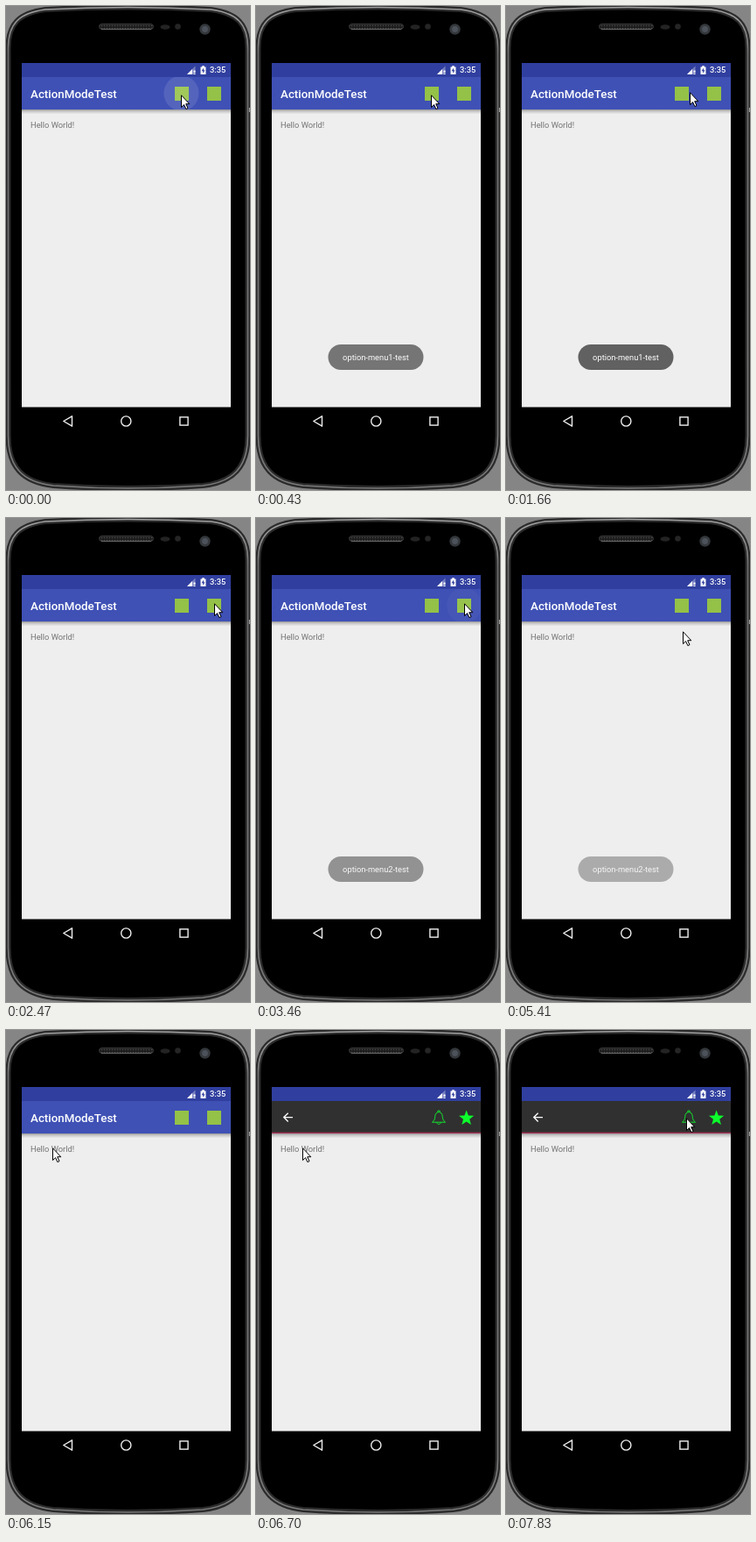
Recreate the animation shown at these times as an HTML page. Size 279 by 552 pixels, loop 8 s.

```html
<!DOCTYPE html>
<html lang="en">
<head>
<meta charset="utf-8">
<title>Action mode demo</title>
<style>
html, body { margin: 0; width: 100%; height: 100%; overflow: hidden; background: #858585; }
svg { display: block; width: 100%; height: 100%; }
text { font-family: Roboto, sans-serif; }
</style>
</head>
<body>
<svg viewBox="0 0 279 552">
  <defs>
    <linearGradient id="shade" x2="0" y2="1">
      <stop stop-opacity=".36"/>
      <stop offset=".4" stop-opacity=".15"/>
      <stop offset="1" stop-opacity="0"/>
    </linearGradient>
    <linearGradient id="rim" x2="0" y2="1">
      <stop stop-color="#a2a2a2"/>
      <stop offset=".1" stop-color="#707070"/>
      <stop offset="1" stop-color="#7a7a7a"/>
    </linearGradient>
    <pattern id="mesh" width="3" height="3" patternUnits="userSpaceOnUse">
      <rect width="3" height="3" fill="#1c1c1c"/>
      <circle cx="1.5" cy="1.5" r=".8" fill="#4a4a4a"/>
    </pattern>
    <clipPath id="bar"><rect x="18" y="81" width="239" height="37"/></clipPath>
    <path id="body" d="M2.5 48C2.500 20 15 8 45 4Q139 -1 234 4C264 8 276.500 20 276.500 48V490C276.500 526 260 543 225 547Q139 553 54 547C19 543 2.500 526 2.500 490Z"/>
  </defs>

  <rect width="279" height="552" fill="#858585"/>
  <g fill="none">
    <use href="#body" fill="#000" stroke="#2b2b2b" stroke-width="6"/>
    <use href="#body" stroke="url(#rim)" stroke-width="1.6"/>
  </g>
  <path d="M278.4 116v5" stroke="#aaa"/>

  <rect x="106.500" y="20.500" width="62" height="6" rx="3" fill="url(#mesh)" stroke="#444" stroke-width=".8"/>
  <path d="M109 26.600H166" stroke="#777" stroke-width=".8"/>
  <ellipse cx="182" cy="24" rx="5.5" ry="2.8" fill="#232323"/>
  <circle cx="196.5" cy="23.5" r="3.3" fill="#252525"/>
  <circle cx="227.5" cy="26.5" r="6.2" fill="#34383c"/>
  <circle cx="227.5" cy="26.5" r="3.4" fill="#4c525a"/>

  <rect x="18" y="118" width="239" height="340" fill="#eee"/>
  <rect x="18" y="118" width="239" height="5.500" fill="url(#shade)"/>
  <rect x="18" y="65" width="239" height="16" fill="#303f9f"/>
  <rect x="18" y="81" width="239" height="37" fill="#3f51b5"/>

  <g fill="#fff">
    <path d="M207 78L216.5 68.5V78Z" fill-opacity=".35"/>
    <path d="M207 78L213 72V78ZM214.5 73.5h2V76h-2zM214.5 77h2v1h-2z"/>
    <path d="M222.5 69.5h1.7v-1.2h2.6v1.2h1.7V78h-6z"/>
    <path d="M226 70.500L223.500 74.200H225.200V77L227.500 73.300H226Z" fill="#303f9f"/>
    <text x="233" y="76.3" font-size="9.3" font-weight="500">3:35</text>
    <text x="28" y="104.6" font-size="13.35" font-weight="500">ActionModeTest</text>
  </g>
  <g fill="#94c147">
    <rect x="193" y="92" width="16" height="16"/>
    <rect x="230" y="92" width="16" height="16"/>
  </g>
  <circle id="ripple" cy="99.5" r="20" fill="#fff" clip-path="url(#bar)"/>

  <g id="mode">
    <rect x="18" y="81" width="239" height="37" fill="#303030"/>
    <rect x="18" y="116.700" width="239" height="1.300" fill="#a82f55"/>
    <path d="M42 99.6H32M36.7 94.7L31.8 99.6L36.7 104.5" fill="none" stroke="#fff" stroke-width="1.35"/>
    <path d="M201.5 105.2C204.3 103 204.6 101 204.8 98.3C205 95.4 206.4 94 209 93.6C211.6 94 213 95.4 213.2 98.3C213.4 101 213.7 103 216.5 105.2ZM207.8 93.7a1.3 1.3 0 1 1 2.4 0M206.8 105.5c.4 2.6 4 2.6 4.4 0" fill="none" stroke="#12e52e"/>
    <path id="star" fill="#0cff2c"/>
  </g>

  <text x="28" y="138.6" font-size="9.3" fill="#737373">Hello World!</text>

  <g id="toast">
    <rect x="82.5" y="386" width="109" height="29" rx="14.5" fill="#616161"/>
    <text id="label" x="137" y="403.8" font-size="9.3" fill="#fff" text-anchor="middle"></text>
  </g>

  <rect x="18" y="457.5" width="239" height="33.5"/>
  <g fill="none" stroke="#eee" stroke-width="1.4">
    <path d="M75.5 467.8V479.2L65.8 473.5Z" stroke-linejoin="round"/>
    <circle cx="137.3" cy="473.5" r="5.6"/>
    <rect x="198.9" y="468.9" width="9.2" height="9.2"/>
  </g>

  <path id="cursor" d="M.5 .8V14.6L3.6 11.6L5.9 16.6L8 15.6L5.7 10.7H9.8Z" fill="#fff" stroke="#000"/>
</svg>
<script>
const LOOP = 8000;
const $ = id => document.getElementById(id);
const set = (id, name, value) => $(id).setAttribute(name, value);

const ramp = (t, from, to) => Math.min(1, Math.max(0, (t - from) / (to - from)));
const easeOut = u => Math.sin(u * Math.PI / 2);
const easeInOut = u => (1 - Math.cos(u * Math.PI)) / 2;

const home = { x: 200, y: 101 };
const moves = [
  { from: 1540, to: 2220, x: 238, y: 97, lift: 3, ease: easeOut },
  { from: 4700, to: 5410, x: 202, y: 129, ease: easeOut },
  { from: 5410, to: 6020, x: 53, y: 134, ease: easeOut },
  { from: 6950, to: 7500, x: 216, y: 97, ease: easeInOut },
  { from: 7550, to: 7800, x: 206, y: 100, ease: easeOut }
];

function pointer(t) {
  let { x, y } = home;
  for (const { from, to, x: endX, y: endY, lift = 0, ease } of moves) {
    const u = ease(ramp(t, from, to));
    x += (endX - x) * u;
    y += (endY - y) * u - lift * Math.sin(u * Math.PI);
  }
  return { x, y };
}

function starPath(cx, cy, outer, inner) {
  const points = Array.from({ length: 10 }, (_, i) => {
    const r = i % 2 ? inner : outer;
    const a = (i / 5 - .5) * Math.PI;
    return `${cx + r * Math.cos(a)} ${cy + r * Math.sin(a)}`;
  });
  return `M${points.join("L")}Z`;
}

function draw(t) {
  const { x, y } = pointer(t);
  set("cursor", "transform", `translate(${Math.round(x)} ${Math.round(y)})`);

  // Each tap shows a ripple, then a toast.
  const second = t >= 3110;
  const age = second ? t - 3110 : t;
  set("ripple", "cx", second ? 238 : 200.5);
  set("ripple", "opacity", .11 * (1 - ramp(age, 160, 430)));
  set("toast", "opacity", ramp(age, 90, 490) - ramp(age, 2120, 2460));
  $("label").textContent = `option-menu${second ? 2 : 1}-test`;

  set("mode", "opacity", ramp(t, 6480, 6700));
}

set("star", "d", starPath(240.6, 100.6, 9, 3.8));

const start = performance.now();
function tick() {
  draw((performance.now() - start) % LOOP);
  requestAnimationFrame(tick);
}
tick();
</script>
</body>
</html>
```
